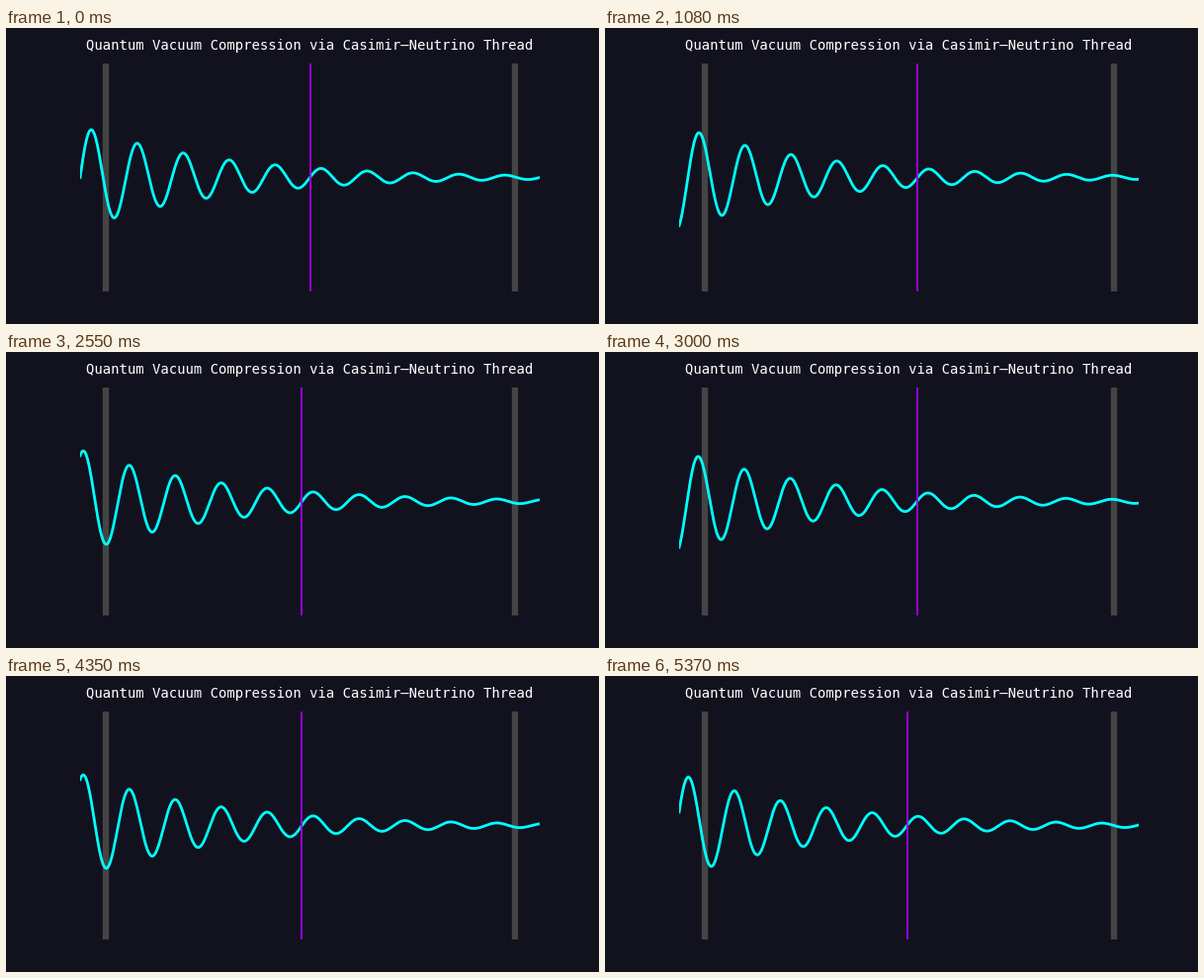
A matplotlib script that plays this animation: 600x300 px, repeating every 5.4 s.

```python
import numpy as np
import matplotlib.pyplot as plt
from matplotlib.animation import FuncAnimation

FRAMES = 180
PERIOD = 30      # frames per oscillation
SWAY = 0.2       # sideways reach of the thread
BACKGROUND = "#12121e"
PLATE = "#444444"

fig, ax = plt.subplots(figsize=(6, 3), dpi=100, facecolor=BACKGROUND)
fig.subplots_adjust(left=0.125, right=0.9, bottom=0.11, top=0.88)
ax.set_xlim(0, 10)
ax.set_ylim(-1.1, 1.1)
ax.axis("off")
ax.set_title("Quantum Vacuum Compression via Casimir–Neutrino Thread",
             color="white", fontsize=10, family="DejaVu Sans Mono", pad=10)

for left in (0.5, 9.4):
    ax.axvspan(left, left + 0.1, color=PLATE)

x = np.linspace(0, 10, 1000)
wave, = ax.plot(x, np.zeros_like(x), color="cyan", lw=2)
thread = ax.axvline(5, color="#9400d3", lw=1.5)


def update(frame):
    shift = SWAY * np.sin(2 * np.pi * frame / PERIOD)
    wave.set_ydata(0.5 * np.exp(-x / 3) * np.sin(2 * np.pi * (x - shift)))
    thread.set_xdata([5 + shift] * 2)
    return wave, thread


anim = FuncAnimation(fig, update, frames=FRAMES, interval=30,
                     repeat=True, repeat_delay=0)
plt.show()
```
